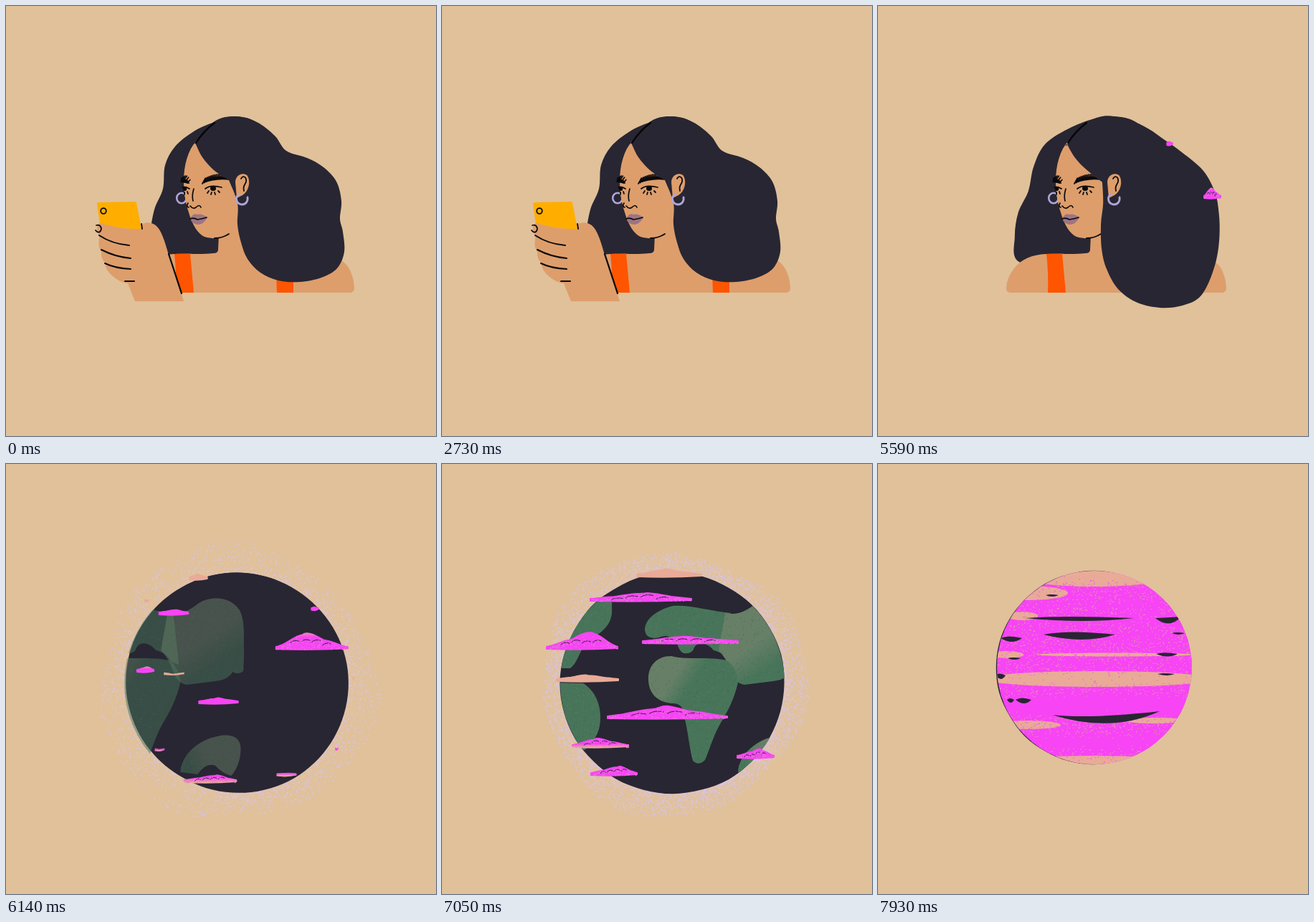
These frames come from a looping animation (600 by 600 pixels, 8 s). An HTML page with a canvas:

```html
<!DOCTYPE html>
<html lang="en">
<head>
<meta charset="utf-8">
<title>Daydream</title>
<style>
html, body { margin: 0; width: 100%; height: 100%; overflow: hidden; background: #e0c19a; }
canvas { display: block; width: 600px; height: 600px; }
</style>
</head>
<body>
<canvas id="stage" width="600" height="600"></canvas>
<script>
const ctx = document.getElementById('stage').getContext('2d');
const LOOP = 8000, TAU = Math.PI * 2;
const BG = '#e0c19a', SKIN = '#dd9e6c', HAIR = '#282632', ORANGE = '#ff5500', YELLOW = '#ffae00';
const PINK = '#f744f4', PEACH = '#e9ab97', LILAC = '#b0a5da', LEAF = '#48755a', SAGE = '#677f67', INK = '#0b0a0c';

const lerp = (a, b, k) => a + (b - a) * k;
const clamp = v => Math.max(0, Math.min(1, v));
const span = (t, a, b) => clamp((t - a) / (b - a));
const ease = k => k * k * (3 - 2 * k);
const mix = (a, b, k) => a.map((v, i) => lerp(v, b[i], k));

function rng(seed) {
  let s = seed * 2654435761 >>> 0;
  return () => {
    s = s + 0x6D2B79F5 >>> 0;
    let x = Math.imul(s ^ s >>> 15, s | 1);
    x ^= x + Math.imul(x ^ x >>> 7, x | 61);
    return ((x ^ x >>> 14) >>> 0) / 4294967296;
  };
}

function fill(d, color) {
  ctx.fillStyle = color;
  ctx.fill(typeof d === 'string' ? new Path2D(d) : d);
}

function line(d, width, color = INK) {
  ctx.strokeStyle = color;
  ctx.lineWidth = width;
  ctx.stroke(typeof d === 'string' ? new Path2D(d) : d);
}

function ellipse(x, y, rx, ry) {
  const p = new Path2D();
  p.ellipse(x, y, Math.max(0, rx), Math.max(0, ry), 0, 0, TAU);
  return p;
}

// Closed smooth curve through a flat list of x, y
function blob(c) {
  const n = c.length / 2, p = new Path2D();
  const X = i => c[(i + n) % n * 2], Y = i => c[(i + n) % n * 2 + 1];
  p.moveTo(X(0), Y(0));
  for (let i = 0; i < n; i++) {
    p.bezierCurveTo(
      X(i) + (X(i + 1) - X(i - 1)) / 6, Y(i) + (Y(i + 1) - Y(i - 1)) / 6,
      X(i + 1) - (X(i + 2) - X(i)) / 6, Y(i + 1) - (Y(i + 2) - Y(i)) / 6,
      X(i + 1), Y(i + 1));
  }
  p.closePath();
  return p;
}

function ring(count, start) {
  const out = [];
  for (let i = 0; i < count; i++) {
    const a = start - i / count * TAU;
    out.push(321.5 + 156.5 * Math.cos(a), 306 + 154.5 * Math.sin(a));
  }
  return out;
}

const backA = [320,154, 288,163, 262,175, 236,196, 222,222, 219,255, 207,284, 202,318, 208,352,
  250,365, 297,344, 330,320, 390,300, 385,220, 355,167];
const backB = [325,154, 296,159, 262,173, 232,194, 217,225, 210,258, 196,288, 191,322, 196,356,
  250,365, 296,345, 330,320, 390,300, 395,225, 365,166];
const frontA = [264,191, 264,191, 274,211, 290,229, 311,243, 311,243, 323,275, 323,305, 328,330,
  337,353, 355,372, 380,383, 410,385, 440,379, 462,366, 472,343, 470,315, 466,297, 468,272,
  461,245, 443,225, 420,212, 391,202, 375,181, 350,162, 320,154, 291,161];
const frontB = [264,194, 264,194, 275,212, 290,228, 313,246, 313,246, 314,275, 311,305, 312,340,
  319,368, 335,395, 362,414, 395,421, 425,418, 447,408, 462,386, 472,353, 476,320, 476,290,
  470,260, 453,230, 425,205, 400,187, 378,171, 352,159, 325,154, 291,162];
const backC = ring(15, -Math.PI / 2), frontC = ring(27, -2.04);

function hair(a, b, c, grow, close, pose) {
  const r = rng(pose + a.length), amp = pose ? 1.2 : 0;
  return blob(mix(mix(a, b, grow), c, close).map(v => v + (r() - 0.5) * amp));
}

function ear() {
  fill('M320 246C320 235 332 231 337 237C342 246 338 259 330 264L322 268Z', SKIN);
  line('M328 241C330 236 336 238 335 245C334 250 330 250 332 258', 1.8);
  line('M326 263C319 264 320 276 329 277C334 277 338 273 337 267', 2.8, LILAC);
}

function brow(x0, y0, x1, y1, n, len) {
  const p = new Path2D();
  for (let i = 0; i < n; i++) {
    const k = i / (n - 1), x = lerp(x0, x1, k), y = lerp(y0, y1, k) - 3 * Math.sin(k * Math.PI);
    p.moveTo(x, y);
    p.lineTo(x + len * 0.55, y - len * (1 - k * 0.35));
  }
  line(p, 1.7);
}

function face() {
  line(ellipse(245, 268, 6.8, 7.2), 2.6, LILAC);
  fill('M265 189C254 201 248 222 248 245C248 262 251 276 255 288C260 306 268 318 277 322C290 326 303 324 312 319L340 300L340 235L300 215Z', SKIN);
  line('M291 324Q302 324 311 318', 1.9);
  fill('M273 248C278 240 292 237 302 238C307 239 311 241 312 243C299 241 286 243 273 248Z', INK);
  brow(274, 248, 306, 241, 13, 8);
  fill('M244 239L255 244L256 248L244 246Z', INK);
  brow(244, 245, 253, 247, 5, 7);
  line('M278 255Q285 249 301 253M246 253Q250 251 256 255', 1.8);
  fill(ellipse(289, 254.5, 4, 3.6), INK);
  fill(ellipse(249.5, 255, 2.8, 3), INK);
  line('M283 258L281 261M287 260L286 263M291 260L292 263M296 258L298 260M249 260L249 263M253 259L254 262', 1.8);
  line('M262 255Q259 265 261 272M254 275Q251 280 255 281M257 279Q261 284 265 281Q270 276 272 281', 1.7);
  fill('M257 296Q262 288 267 291Q273 289 281 295Q276 305 267 305Q259 304 257 296Z', '#9d7482');
  line('M257 297Q262 295 267 298Q274 297 280 295', 1.7);
}

function body(close) {
  ctx.save();
  ctx.translate(322, 0);
  ctx.scale(1 - 0.25 * close, 1);
  ctx.translate(-322, 0);
  fill('M297 318L296 340Q296 345 289 345C270 347 250 345 235 346C215 347 200 353 190 366Q179 380 179 394Q179 400 186 400L480 400Q486 400 486 393C485 375 478 358 462 352L345 352L335 300Z', SKIN);
  fill('M235 346L257 345.5L262 400L237 400Q238 372 235 346Z', ORANGE);
  fill('M377 375L401 375L401 400L378 400Z', ORANGE);
  ctx.restore();
}

const phoneUp = [129,276, 180,275, 187,311, 133,304], phoneFlat = [81,413.5, 130,412.3, 130,413.3, 81,414.3];

function phone(t) {
  const k = ease(span(t, 2860, 3770)), gone = ease(span(t, 4030, 4550));
  if (gone < 1) {
    const c = mix(phoneUp, phoneFlat, k);
    const p = new Path2D();
    for (let i = 0; i < 8; i += 2) p.lineTo(lerp(c[i], 65, gone), c[i + 1]);
    p.closePath();
    fill(p, YELLOW);
    line(p, 4, YELLOW);
    if (k < 0.7) line(ellipse(lerp(136, 92, k), lerp(286, 412, k), 3.8, 3.9 * (1 - k)), 1.8);
  }
  const away = ease(span(t, 3510, 3900));
  if (away === 1) return;
  ctx.save();
  ctx.beginPath();
  ctx.rect(0, 0, 600, 412);
  ctx.clip();
  ctx.translate(245 + 15 * away, 412 + 75 * away);
  ctx.rotate(-0.94 * k);
  ctx.translate(-245, -412);
  fill('M131 303C146 306 160 312 188 311L190 304C200 300 208 303 214 312C221 324 224 338 227 347L248 412L180 412L170 387Q159 386 149 377Q139 369 138 358Q132 352 133 343Q128 337 130 325Q131 320 127 315Q126 305 131 303Z', SKIN);
  line('M130 320Q148 332 172 334M133 340Q152 350 174 352M138 359Q152 366 174 367M166 384L179 384', 2);
  line('M126 306C132 304 135 311 131 315Q128 317 125 313M189 304L190 311', 1.8);
  line('M227 346L245 401', 2.3);
  ctx.restore();
}

function woman(t, pose) {
  const grow = ease(span(t, 4810, 5590)), close = ease(span(t, 5590, 6180));
  fill(hair(backA, backB, backC, grow, close, pose), HAIR);
  body(close);
  face();
  if (close > 0.05) ear();
  fill(hair(frontA, frontB, frontC, grow, close, pose), HAIR);
  if (close <= 0.05) ear();
  if (close < 0.3) line('M291 163Q276 174 265 191', 2.2, '#050407');
  if (t < 4680) phone(t);
}

const lands = [
  ['M186 232C186 215 205 203 225 198C250 196 275 205 306 208L314 280L303 276C300 266 289 262 282 260C273 249 260 247 255 256Q252 266 240 264Q234 262 230 247Q218 236 206 242Q188 246 186 232Z', 100, 200, 110, 200],
  ['M298 208C318 212 330 203 342 194C360 183 385 185 398 203C407 218 404 240 405 262L404 289Q397 295 389 290Q383 301 365 303L325 308Q311 306 305 287Q299 270 289 260Z', 325, 205, 372, 275],
  ['M191 302C190 281 203 268 223 268C245 274 274 268 300 274Q315 284 316 305C310 330 302 344 292 361C281 380 276 400 270 413Q261 422 253 414C248 396 246 370 240 348Q239 333 223 334C201 331 192 319 191 302Z', 195, 290, 242, 320],
  ['M316 430C317 407 340 384 372 379C395 376 402 387 400 403C399 416 393 429 387 435Q375 432 365 421Q352 416 340 433Z', 385, 405, 330, 425],
  ['M140 200C142 225 125 235 110 245C95 255 95 275 82 285L30 285L20 215C60 190 110 185 140 193Z', 0, 200, 20, 200],
  ['M50 305L100 306C120 318 128 345 122 370C115 390 105 400 90 404L50 390Z', 0, 300, 20, 300]
];

function drawLands(t) {
  ctx.save();
  ctx.globalAlpha = span(t, 5980, 6240);
  ctx.translate((t - 6500) * 97 / 520, 0);
  const all = new Path2D();
  for (const [d, x0, y0, x1, y1] of lands) {
    const g = ctx.createLinearGradient(x0, y0, x1, y1), p = new Path2D(d);
    g.addColorStop(0, SAGE);
    g.addColorStop(0.55, SAGE);
    g.addColorStop(1, LEAF);
    fill(p, g);
    all.addPath(p);
  }
  ctx.clip(all);
  const r = rng(8);
  ctx.globalAlpha *= 0.28;
  for (let i = 0; i < 4200; i++) {
    ctx.fillStyle = i % 2 ? '#2f5e43' : '#6c9470';
    ctx.fillRect(20 + r() * 390, 185 + r() * 255, 1.4, 1.4);
  }
  ctx.restore();
}

function glow(t, tick, globe) {
  const power = span(t, 5850, 6300) * (1 - span(t, 7280, 7850));
  if (!power) return;
  const r = rng(tick), fade = lerp(1, 0.8, span(t, 6500, 7020));
  ctx.save();
  for (let i = 0; i < 7000 * power; i++) {
    const a = r() * TAU, reach = (39 + 7 * Math.sin(3 * a + tick) + 4 * Math.sin(7 * a)) * fade;
    const d = Math.pow(r(), 1.7) * reach, s = 1 + r() * 1.2;
    ctx.globalAlpha = 0.3 + r() * 0.55;
    ctx.fillStyle = i % 5 ? '#d9c5e8' : '#e4c4c6';
    ctx.fillRect(globe.x + (globe.rx - 2 + d) * Math.cos(a), globe.y + (globe.ry - 2 + d) * Math.sin(a), s, s);
  }
  ctx.restore();
}

// Pairs of poses: left, right, base, height, peach share
const clouds = [
  [[245,292,161,16,1], [272,362,157,12,1]],
  [[182,286,210,20,.15], [207,348,191,13,.2]],
  [[142,247,290,37,-.5], [146,245,258,27,.1]],
  [[326,476,252,32,-.4], [280,413,250,11,.05]],
  [[204,265,294,4,1], [160,246,303,10,1]],
  [[209,384,334,28,.1], [231,398,355,19,.25]],
  [[162,267,400,23,.4], [182,260,395,14,.3]],
  [[215,355,444,22,.5], [208,272,434,14,.2]],
  [[357,426,435,12,.6], [412,463,410,14,.1]],
  [[453,470,399,13,0], [452,452,399,0,0]],
  [[441,452,210,5,0], [446,446,205,0,0]],
  [[190,203,192,8,1], [196,196,190,0,1]],
  [[480,490,300,4,1], [484,484,300,0,1]]
];
const sprouts = { 3: [455,478,268,16,-.3], 10: [403,411,194,6,0] };

function cloud(c, seed) {
  const [x0, x1, base, h, share] = c, w = x1 - x0;
  if (w < 2 || h < 0.5) return;
  const r = rng(seed + 30), peak = 0.35 + r() * 0.3, ph = r() * 6;
  const top = u => {
    const v = u < peak ? u / peak : (1 - u) / (1 - peak);
    return base - 3 - (h - 4) * Math.pow(v, 1.15) * (0.85 + 0.15 * Math.abs(Math.sin(u * 11 + ph)));
  };
  const p = new Path2D();
  p.moveTo(x0, base);
  for (let i = 0; i <= 30; i++) p.lineTo(x0 + w * i / 30, top(i / 30));
  p.lineTo(x1, base - 1);
  p.quadraticCurveTo(x0 + w / 2, base + 2, x0, base);
  const g = ctx.createLinearGradient(0, base - h, 0, base), s = Math.abs(share);
  g.addColorStop(0, share < 0 || s === 1 ? PEACH : PINK);
  g.addColorStop(share < 0 ? s : 1 - s, s === 1 ? PEACH : PINK);
  g.addColorStop(1, share > 0.25 ? PEACH : PINK);
  fill(p, g);
  line(p, Math.min(2, h / 4), g);
  if (h < 9 || s === 1) return;
  const gaps = new Path2D();
  for (let i = 0; i < 4; i++) {
    const u = 0.25 + i * 0.15, x = x0 + w * u, y = lerp(top(u), base, 0.25 + r() * 0.3);
    gaps.moveTo(x - w * 0.05, y + 2);
    gaps.quadraticCurveTo(x, y - 3, x + w * 0.07, y);
  }
  line(gaps, 1, HAIR);
  ctx.fillStyle = '#e37bd0';
  for (let i = 0; i < w; i++) {
    const u = r(), y = lerp(top(u), base, r());
    ctx.fillRect(x0 + w * u, y, 1.3, 1.3);
  }
}

function drawClouds(t, globe) {
  const merge = span(t, 7020, 7865);
  if (t < 5460 || merge === 1) return;
  ctx.save();
  ctx.globalAlpha = 1 - Math.pow(merge, 3);
  clouds.forEach(([a, b], i) => {
    const mid = (a[0] + a[1]) / 2;
    const seed = sprouts[i] || [mid, mid, a[2], 0, a[4]];
    const delay = sprouts[i] ? 5590 : 5700 + i * 37 % 7 * 60;
    let c = mix(seed, a, ease(span(t, delay, 6500)));
    c = mix(c, b, ease(span(t, 6500, 7020)));
    if (merge && c[1] - c[0] > 2) {
      c[0] = lerp(c[0], globe.x - globe.rx * 0.9, merge);
      c[1] = lerp(c[1], globe.x + globe.rx * 0.9, merge);
      c[2] = lerp(c[2], globe.y + (c[2] - 306) * 0.8, merge);
      c[3] *= 1 + merge;
    }
    cloud(c, i);
  });
  ctx.restore();
}

// x, y, half width, half height, from the globe's centre
const peachBands = [[0,-130,112,17], [-92,-104,56,10], [-100,-72,22,6], [5,16,160,11], [0,131,95,8],
  [-92,80,46,6], [85,74,42,4], [-122,-18,24,5], [30,-18,110,2.5]];
const darkGaps = [[-20,-69,76,4,0], [104,-67,18,6,2], [-20,-46,50,7,0], [-115,-41,15,5,0], [102,-19,15,3.5,0],
  [-111,-13,9,2,0], [-130,11,7,5,0], [101,9,12,2,0], [-98,45,11,5,0], [-116,45,5,4,0], [17,71,75,8,5], [118,-48,9,2,0],
  [-58,-101,9,2,0]];

function bands(t, tick, globe) {
  const q = span(t, 7085, 7930);
  if (!q) return;
  const r = rng(5);
  ctx.save();
  ctx.translate(globe.x, globe.y);
  ctx.scale(globe.rx / 136, globe.ry / 135);
  ctx.clip(ellipse(1, 0, 136, 135));
  const reach = (y, k) => ease(clamp((q - k * 0.4) * 1.7));
  for (let i = 0; i < 11; i++) {
    const y = -135 + (i + 0.5) * 270 / 11, x = (r() - 0.5) * 260, g = reach(y, r());
    fill(ellipse(x * (1 - g), y, 330 * g, 20 * g), PINK);
  }
  for (const [x, y, w, h] of peachBands) {
    const g = reach(y, r());
    fill(ellipse(x, y, w * g, h * g), PEACH);
  }
  // Chalky grain along the seams
  const grain = rng(tick + 90);
  const seams = [-116, -100, -79, -55, -35, -18, 2, 30, 75, 85, 122];
  ctx.globalAlpha = 0.75;
  for (let i = 0; i < 4200 * ease(span(q, 0.5, 1)); i++) {
    const y = seams[i % seams.length] + (grain() + grain() + grain() - 1.5) * 12;
    ctx.fillStyle = i % 3 ? '#e2a0a8' : PINK;
    ctx.fillRect((grain() - 0.5) * 272, y, 1.5, 1.2);
  }
  ctx.globalAlpha = 1;
  for (const [x, y, w, h, bend] of darkGaps) {
    fill(`M${x - w} ${y - bend}Q${x - w * 0.3} ${y - h + bend * 1.8} ${x + w} ${y - bend * 2}Q${x + w * 0.1} ${y + h * 2 + bend} ${x - w} ${y - bend}Z`, HAIR);
  }
  const notch = span(q, 0.85, 1);
  if (notch) {
    for (const [x, y, w] of [[124, -92, 9], [128, -71, 7], [129, -55, 6]])
      fill(ellipse(x + 5, y, w * notch, 6 * notch), BG);
  }
  ctx.restore();
}

function planet(t, tick) {
  const k = ease(span(t, 7150, 7930));
  const globe = { x: lerp(321.5, 301, k), y: lerp(306, 284, k), rx: lerp(156.5, 136, k), ry: lerp(154.5, 135, k) };
  glow(t, tick, globe);
  if (t < 6180) woman(t, tick % 3);
  else {
    const r = rng(tick % 3 + 60), c = [];
    for (let i = 0; i < 24; i++) {
      const a = i / 24 * TAU, s = 1 + (r() - 0.5) * 0.009;
      c.push(globe.x + globe.rx * s * Math.cos(a), globe.y + globe.ry * s * Math.sin(a));
    }
    fill(blob(c), HAIR);
  }
  if (t > 5980) {
    ctx.save();
    ctx.clip(ellipse(globe.x, globe.y, globe.rx, globe.ry));
    drawLands(t);
    ctx.restore();
  }
  bands(t, tick, globe);
  drawClouds(t, globe);
}

function draw(t, tick) {
  ctx.lineCap = ctx.lineJoin = 'round';
  ctx.fillStyle = BG;
  ctx.fillRect(0, 0, 600, 600);
  if (t < 5590) {
    woman(t, tick % 3);
    drawClouds(t, { x: 321, y: 306, rx: 156, ry: 154 });
  } else planet(t, tick);
}

const start = performance.now();
let last = -1;
function loop() {
  const now = (performance.now() - start) % LOOP;
  const tick = now < 5590 ? Math.floor(now / 130) : 43 + Math.floor((now - 5590) / 65);
  if (tick !== last) {
    last = tick;
    draw(tick < 43 ? tick * 130 : 5590 + (tick - 43) * 65, tick);
  }
  requestAnimationFrame(loop);
}
loop();
</script>
</body>
</html>
```
